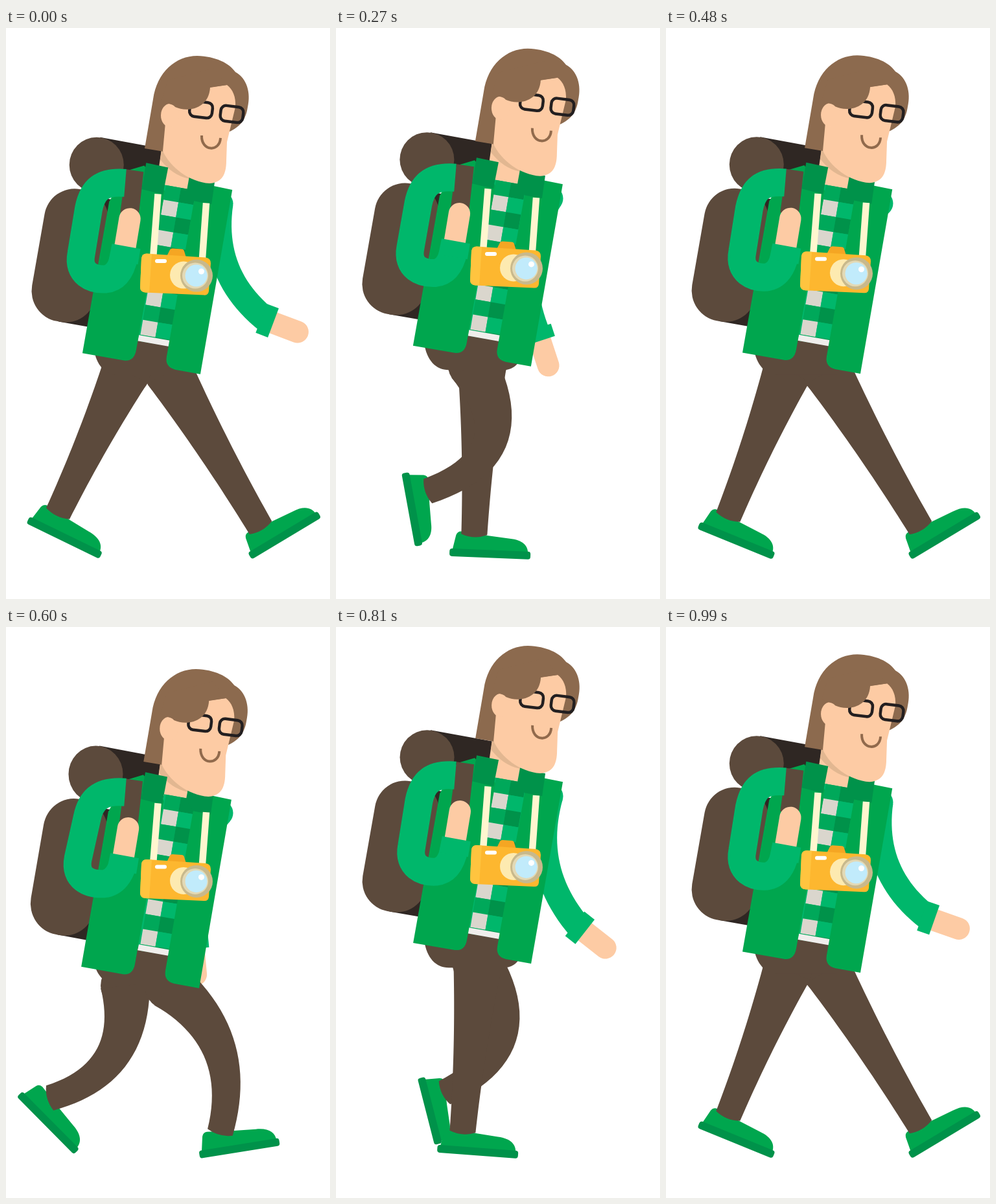
Write an HTML page with a canvas that moves like this. It is 500 by 882 pixels and loops after 1.02 s.

```html
<!DOCTYPE html>
<html lang="en">
<head>
<meta charset="utf-8">
<title>Walking traveller</title>
<style>
html, body { margin: 0; height: 100%; overflow: hidden; background: #fff; }
canvas { display: block; width: 100%; height: 100%; }
</style>
</head>
<body>
<canvas id="stage" width="500" height="882"></canvas>
<script>
const g = document.getElementById('stage').getContext('2d');
const LOOP = 1020, STEP = 30, HALF = LOOP / 2, GROUND = 820, LEAN = -.08;
const BROWN = '#5c4a3c', DARK = '#2f2723', GREEN = '#00a64e', DEEP = '#00924a',
      BRIGHT = '#00b76b', SKIN = '#fdcba4', HAIR = '#8c6a4e', INK = '#231f20';
const { sin, cos, max, min, PI, hypot } = Math;
const wave = (t, peak, period) => cos(2 * PI * (t - peak) / period);

// How far the body sinks during one step: [time, share]
const SINK = [[0, .36], [90, .97], [150, 1], [210, .39], [390, 0], [480, .34]];

// Smooth periodic curve through SINK
function sink(t) {
  t %= HALF;
  const n = SINK.length;
  const time = k => SINK[(k + n) % n][0] + Math.floor(k / n) * HALF;
  const value = k => SINK[(k + n) % n][1];
  const rate = k => (value(k + 1) - value(k)) / (time(k + 1) - time(k));
  const slope = k => {
    const a = time(k) - time(k - 1), b = time(k + 1) - time(k);
    return (rate(k - 1) * b + rate(k) * a) / (a + b);
  };
  let i = n - 1;
  while (time(i) > t) i--;
  const h = time(i + 1) - time(i), s = (t - time(i)) / h, q = 1 - s;
  return value(i) * q * q * (1 + 2 * s) + value(i + 1) * s * s * (3 - 2 * s)
    + h * s * q * (slope(i) * q - slope(i + 1) * s);
}

function fill(color, d) {
  g.fillStyle = color;
  g.fill(new Path2D(d));
}

function line(color, width, d, cap = 'butt') {
  g.strokeStyle = color;
  g.lineWidth = width;
  g.lineCap = cap;
  g.stroke(new Path2D(d));
}

function disc(color, x, y, rx, ry = rx) {
  g.fillStyle = color;
  g.beginPath();
  g.ellipse(x, y, rx, ry, 0, 0, 7);
  g.fill();
}

function box(x, y, w, h, r) {
  g.beginPath();
  g.roundRect(x, y, w, h, r);
}

function group(x, y, deg, draw) {
  g.save();
  g.translate(x, y);
  g.rotate(deg * PI / 180);
  draw();
  g.restore();
}

const lower = (dy, draw) => group(LEAN * dy, dy, 0, draw);

// Lowers y = 200 by top and y = end by bottom
function stretch(top, bottom, end, draw) {
  const k = (bottom - top) / (end - 200), shift = top - 200 * k;
  g.save();
  g.transform(1, 0, LEAN * k, 1 + k, LEAN * shift, shift);
  draw();
  g.restore();
}

// Tapered tube from (x, y) to (ax, ay), bowed sideways by bend
function limb(color, x, y, ax, ay, bend, width) {
  const dx = ax - x, dy = ay - y, len = hypot(dx, dy);
  const nx = dy / len * bend * 4, ny = -dx / len * bend * 4;
  const edge = (s, side, ahead = 0) => {
    let tx = dx + nx * (1 - 2 * s), ty = dy + ny * (1 - 2 * s);
    const m = hypot(tx, ty), r = side * width(s) / 2, bow = s * (1 - s);
    tx /= m;
    ty /= m;
    return [x + dx * s + nx * bow - ty * r + tx * ahead, y + dy * s + ny * bow + tx * r + ty * ahead];
  };
  disc(color, x, y, width(0) / 2);
  g.beginPath();
  for (let i = 0; i <= 24; i++) g.lineTo(...edge(i / 24, 1));
  g.quadraticCurveTo(...edge(1, 0, 8), ...edge(1, -1));
  for (let i = 23; i >= 0; i--) g.lineTo(...edge(i / 24, -1));
  g.fill();
}

// On the ground: roll from heel to toe
function stance(s) {
  const deg = s < .29 ? -31 * (1 - s / .29) ** 1.3 : 26 * max(0, (s - .41) / .59) ** 1.5;
  const a = deg * PI / 180;
  return {
    deg,
    x: 393 - 313 * s - 14 * sin(PI * s),
    y: GROUND - 34 * cos(a) - max(88 * sin(a), -37 * sin(a)),
    bend: 47 * max(0, sin(PI * s / .53)),
    length: 1
  };
}

// In the air: kick back, then swing forward
function swing(s) {
  const arc = sin(PI * s), turn = sin(2 * PI * s);
  return {
    deg: 26 - 57 * s + 86 * sin(PI * s ** 1.3),
    x: 80 + 313 * (s ** 3 - .05 * turn),
    y: 750 + 22 * s - 48 * arc,
    bend: 66 * max(0, arc) ** .7,
    length: 1 + .22 * min(0, turn)
  };
}

function leg(t, drop) {
  const f = t < HALF ? stance(t / HALF) : swing(min(1, (t - HALF) / 480));
  group(f.x, f.y, f.deg, () => {
    g.scale(f.length, 1);
    fill(GREEN, 'M-33 26L-28 2Q-26-4-20-4L22 1 55 4C75 5 84 14 84 26Z');
    g.fillStyle = DEEP;
    box(-37, 23, 125, 12, 4);
    g.fill();
  });
  limb(BROWN, 218 + 35 * wave(t, 50, LOOP), 518 + drop, f.x, f.y, f.bend, s => 76 - 62 * s + 26 * s * s);
}

function farArm(t, top) {
  const deg = 2 + 20.5 * wave(t, 977, LOOP), a = deg * PI / 180;
  const reach = 214 - .05 * (deg - 2) ** 2;
  const x = 331, y = 262 + top, cx = x + reach * sin(a), cy = y + reach * cos(a);
  const hand = 62 - 1.9 * deg;
  group(cx, cy, hand, () => line(SKIN, 34, 'M0 0H50', 'round'));
  limb(BRIGHT, x, y, cx, cy, -28, () => 39);
  group(cx, cy, hand, () => fill(BRIGHT, 'M-10-24H10V24H-10Z'));
}

function pack() {
  group(100, 340, 10, () => {
    fill(DARK, 'M0-95H60V102H0Z');
    g.fillStyle = BROWN;
    box(-50, -102, 100, 204, 47);
    g.fill();
  });
  fill(DARK, 'M146 160L245 178 236 232 150 240Z');
  disc(BROWN, 140.5, 202, 42);
}

function hips() {
  fill(BROWN, 'M136 485C140 512 154 527 174 527H262Q280 524 285 508L250 440H200Z');
}

function shirt() {
  g.save();
  g.clip(new Path2D('M244 233L300 243V300L252 482 204 474 200 400Z'));
  group(243, 256, 9.7, () => {
    const cell = 23.5;
    g.fillStyle = BRIGHT;
    g.fillRect(-60, -60, 160, 320);
    for (let r = -1; r < 10; r++) {
      g.fillStyle = r & 1 ? '#00a85a' : '#dad6cd';
      g.fillRect(0, r * cell, cell, cell);
      g.fillStyle = r & 1 ? DEEP : BRIGHT;
      g.fillRect(cell, r * cell, cell, cell);
    }
  });
  g.restore();
  fill('#f0eeec', 'M205 465L256 474 253 483 203 474Z');
}

function jacket() {
  fill(GREEN, 'M119 489L183 500Q199 502 202 484L246 242 214 203 187 211 160 258Z');
  fill(GREEN, 'M288 236L320 234 350 240 301 521 262 514Q246 510 249 494L291 257Z');
  fill(DEEP, 'M217 199L251 206 243 247 210 239Z');
  fill(DEEP, 'M284 218L323 227 318 262 291 257 280 240Z');
}

function camera(top, drop) {
  const y = 345 + drop;
  line('#fff6cf', 10.5, `M234.5 ${247 + top}L227 ${y}M309 ${261 + top}L303 ${y}`);
  group(0, drop, 0, () => {
    fill('#f5a623', 'M248 342L253 332Q254 330 257 330L271 331Q274 331 275 334L278 344Z');
    fill('#fdb72f', 'M217 338L308 344Q316 345 316 353L313 396Q312 403 305 402L215 398Q207 397 207 390L209 345Q210 338 217 338Z');
    fill('#ffc43f', 'M217 338L225 338.5 221 398.3 215 398Q207 397 207 390L209 345Q210 338 217 338Z');
    line('#fff', 6, 'M233 349.5H245', 'round');
    disc('#fdeab0', 274, 371, 21);
    disc('#c8b98c', 294, 372, 25);
    disc('#e3d9b5', 292, 372, 20);
    disc('#c1ebfb', 293.5, 372, 17);
    disc('#fff', 301.5, 365.5, 4.5);
  });
}

function nearArm(top, ex, ey) {
  const hx = ex / 2;
  lower(top, () => fill(BROWN, 'M186 209L213 213 205 284 177 276Z'));
  line(BRIGHT, 43, `M184 ${230 + top}C148 ${227 + top} ${133 + hx} ${240 + top} ${127 + hx} ${270 + top}`
    + `L${115 + ex} ${340 + ey}C${109 + ex} ${371 + ey} ${133 + ex} ${380 + ey} ${153 + hx} ${379 + ey}`
    + `C${170 + hx} ${377 + ey} ${178 + hx} ${362 + ey} ${182 + hx} ${342 + top}`);
  group(hx, top, 0, () => {
    fill(SKIN, 'M174 283A16.5 16.5 0 0 1 207 288L199 336 166 331Z');
    fill(BRIGHT, 'M163 324L207 332 203 356 158 349Z');
  });
}

function neck() {
  fill(SKIN, 'M241 180L235 222 246 250 282 256 286 228Z');
  fill('#e2b791', 'M241 182L238 203Q257 228 283 233L290 215Z');
}

function glass(x, y) {
  group(x, y, 7, () => {
    box(-17.5, -12, 35, 24, 8);
    g.lineWidth = 4.5;
    g.strokeStyle = INK;
    g.stroke();
  });
}

function head() {
  fill(HAIR, 'M214 186L227 110C233 68 262 43 295 43 324 44 344 54 354 68 372 78 378 100 373 122 370 143 360 153 345 160L260 160 244 191Z');
  fill(SKIN, 'M246 146L242 190C253 215 283 238 314 240 332 239 340 228 340 205L341 176 354 122C355 106 350 95 341 88L312 92 255 115Z');
  disc(SKIN, 253, 135, 14, 18);
  glass(301, 126);
  glass(348.5, 133);
  fill(HAIR, 'M240 112C250 118 258 117 261 122 280 131 313 125 315 92L341 88 320 62 250 80Z');
  line('#916a4c', 4, 'M302 166C301 191 330 192 331 170');
}

function draw(t) {
  const drop = sink(t), top = 26 * drop, low = 37 * drop, nod = 36 * drop;
  const bounce = 20 * sink(t + 30);
  g.clearRect(0, 0, 500, 882);
  stretch(top, nod, 441, pack);
  farArm(t, top);
  leg(t, low);
  leg((t + HALF) % LOOP, low);
  lower(top, hips);
  lower(nod - 13, neck);
  group(0, top, 0, shirt);
  stretch(top, low, 490, jacket);
  lower(nod - 13, head);
  camera(top, bounce);
  nearArm(top, 5 * wave(t, 400, HALF), .85 * bounce);
}

function tick() {
  draw(Math.floor(performance.now() % LOOP / STEP) * STEP);
  requestAnimationFrame(tick);
}
tick();
</script>
</body>
</html>
```
